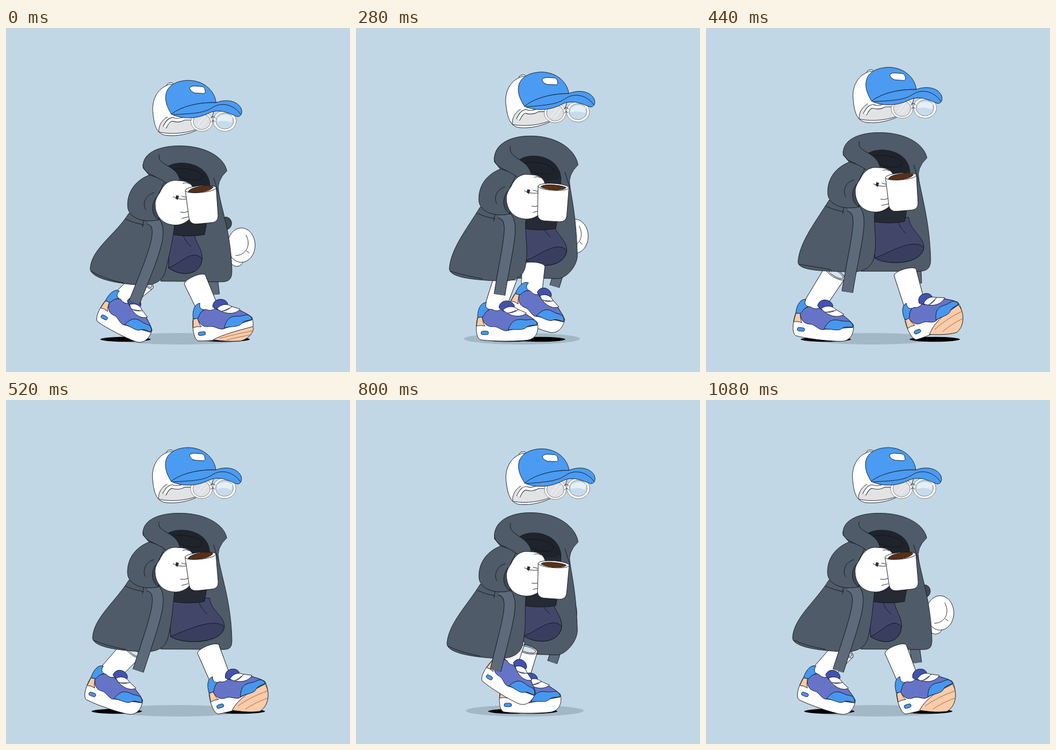
Animation of 600x600 px, one loop 1.12 s. Source, as an HTML page with a canvas:

```html
<!DOCTYPE html>
<html lang="en">
<head>
<meta charset="utf-8">
<title>Coffee walk</title>
<style>
html, body { margin: 0; height: 100%; overflow: hidden; background: #c1d7e5; }
canvas { display: block; width: 600px; height: 600px; }
</style>
</head>
<body>
<canvas id="stage" width="600" height="600"></canvas>
<script>
const ctx = document.getElementById('stage').getContext('2d');
const LOOP = 1120, STEP = LOOP / 2, TICK = 40;
const INK = '#111318', COAT = '#4f5b68', CUFF = '#3f4955', BELT = '#5d6a79';
const BLUE = '#4698ee', CAP = '#4a9bf1', PEACH = '#fccba9';
const LINE = 0.85;

// Swings between -1 and 1, highest at the given time.
const wave = (t, peak, period = STEP) => Math.cos(2 * Math.PI * (t - peak) / period);

// Soft pulse around one moment of the loop.
function bump(t, peak, width) {
  const d = (t - peak + 2.5 * LOOP) % LOOP - LOOP / 2;
  return Math.exp(-((d / width) ** 2));
}

const clamp = v => Math.min(1, Math.max(0, v));

const warp = (d, map) =>
  d.replace(/(-?[\d.]+) (-?[\d.]+)/g, (_, x, y) => map(+x, +y).join(' '));

function paint(path, fill, line) {
  if (fill) { ctx.fillStyle = fill; ctx.fill(path); }
  if (line) { ctx.strokeStyle = line; ctx.lineWidth = LINE; ctx.stroke(path); }
}

const draw = (d, fill, line = INK) => paint(new Path2D(d), fill, line);

function oval(x, y, rx, ry, fill, line = INK) {
  const p = new Path2D();
  p.ellipse(x, y, rx, ry, 0, 0, 7);
  paint(p, fill, line);
}

// Thick outlined strip along a path.
function band(d, width, fill) {
  const p = new Path2D(d);
  ctx.strokeStyle = INK; ctx.lineWidth = width; ctx.stroke(p);
  ctx.strokeStyle = fill; ctx.lineWidth = width - 2 * LINE; ctx.stroke(p);
}

function placed(x, y, degrees, content) {
  ctx.save();
  ctx.translate(x, y);
  ctx.rotate(degrees * Math.PI / 180);
  content();
  ctx.restore();
}

// Pose of one foot; t counts from its heel strike.
function gait(t, shift) {
  const push = bump(t, 690, 180), heel = bump(t, 1025, 78);
  const x = 281 + shift + 96 * wave(t, 1090, LOOP) + 8 * wave(t, 440);
  return {
    x,
    y: 516 - 20 * bump(t, 800, 170) - 11 * push - 11 * heel,
    turn: 46 * push - 29 * heel,
    sockX: 275 + shift + 56 * wave(t, 1080, LOOP),
    sockY: 435 + 10 * wave(t, 98) - 16 * bump(t, 820, 90),
    shadowX: x + 4 - 30 * bump(t, 650, 70)
  };
}

function shoe(turn) {
  draw('M-51 -12C-55 5 -54 25 -46 28C-26 31 20 31 38 28C54 24 56 8 53 -3L29 -20L-41 -20Z', '#fff');
  const k = clamp(-turn / 14);
  if (k > 0.1) {
    draw(`M-20 29C-2 ${30 - 18 * k} 25 ${28 - 22 * k} 52 ${24 - 22 * k}C57 14 50 ${28 + 12 * k} 28 ${29 + 16 * k}C8 ${30 + 12 * k} -8 ${30 + 4 * k} -20 29Z`, PEACH);
    draw(`M-8 ${30 - 5 * k}Q20 ${30 - 14 * k} 53 ${26 - 11 * k}M4 ${30 + 4 * k}Q24 ${30 - 2 * k} 49 ${28 - k}`, null, '#8a6a55');
  }
  draw('M-51 -10L-43 -13C-42 -3 -40 2 -38 4Q-46 2 -53 4Z', PEACH);
  draw('M-44 -15C-36 -22 -30 -26 -26 -25C-18 -20 -10 -24 -8 -28C10 -22 28 -22 38 -14C48 -8 53 -4 53 2L4 11C-6 16 -14 4 -24 5C-34 6 -42 0 -44 -15Z', '#6674c8');
  draw('M-51 -12C-51 -27 -45 -37 -36 -37C-39 -28 -34 -26 -30 -25C-38 -22 -40 -14 -42 -12Q-47 -10 -51 -12Z', BLUE);
  draw('M2 11C8 -6 16 -9 30 -7C40 -6 48 -12 53 0C52 4 40 0 34 6C28 13 12 8 2 11Z', BLUE);
  draw('M-14 -28C-13 -40 0 -43 9 -37C15 -32 14 -27 8 -27L-6 -22Z', '#4252b0');
  draw('M-7 -24C2 -33 14 -30 18 -26L34 -19C26 -11 8 -11 -7 -24ZM1 -19Q10 -18 20 -25', '#fff');
  const tag = new Path2D();
  tag.roundRect(-45, 13, 13, 6, 3);
  paint(tag, BLUE, INK);
}

function leg({ x, y, turn, sockX, sockY }) {
  const a = turn * Math.PI / 180, cos = Math.cos(a), sin = Math.sin(a);
  const dx = x - 22 * cos + 24 * sin - sockX, dy = y - 22 * sin - 24 * cos - sockY;
  const len = Math.hypot(dx, dy);
  placed(sockX, sockY, -Math.atan2(dx, dy) * 180 / Math.PI, () => {
    draw(`M-20 0C-20 -9 20 -9 20 0L18 ${len + 4}L-18 ${len + 4}Z`, '#fff');
    if (dx < -4) {
      oval(0, 0, 20, 7, '#fff');
      oval(1, 0, 16, 5, '#d5e3ee');
    }
  });
  placed(x, y, turn, () => {
    ctx.scale(1 - 0.003 * Math.abs(turn), 1);
    shoe(turn);
  });
}

function backArm(t, bob) {
  const x = 375 + 36 * wave(t, 30, LOOP), y = 371 + 17 * bob;
  oval(x - 8, y + 27, 11, 10, '#fff');
  oval(x, y, 24, 30, '#fff');
  draw(`M${x + 8} ${y - 18}C${x + 18} ${y} ${x + 8} ${y + 18} ${x - 10} ${y + 18}M${x + 9} ${y + 10}L${x + 14} ${y + 14}`);
  oval(x - 27, y - 38, 10, 11, CUFF);
}

function backBelt(t, bob) {
  const y = 458 + 16 * bob;
  band(`M${359 + 7 * wave(t, 420)} ${y - 42}L${355 + 14 * wave(t, 480)} ${y}`, 18, BELT);
}

function shorts(t, collar, bob, sway) {
  const ax = 341 + 14 * wave(t, 530, LOOP), ay = collar + 148;
  const bx = 361 + 20 * wave(t, 500, LOOP), by = 395 + 16 * bob;
  const cx = 290 + 9 * sway, cy = 412 + 14 * bob;
  const opening = `C${bx - 3} ${by + 30} ${cx + 22} ${by + 32} ${cx} ${cy}Z`;
  draw(`M285 ${ay}L${ax} ${ay}C${ax + 2} ${ay + 22} ${bx + 1} ${by - 18} ${bx} ${by}${opening}`, '#42476a');
  draw(`M${cx} ${cy}C${cx + 22} ${cy - 8} ${bx - 18} ${by - 18} ${bx} ${by}${opening}`, '#393e5f');
  draw(`M${ax - 18} ${ay + 8}Q${ax - 14} ${ay + 20} ${ax - 4} ${ay + 28}`);
}

function cup(x, y, lean) {
  const slosh = 4 * (1 - lean);
  placed(x, y, -6 + 10 * lean, () => {
    draw('M-27 -27L-25 22Q-24 33 -12 33L14 33Q25 33 26 22L27 -27Q0 -37 -27 -27Z', '#fff');
    oval(0, -27, 27, 6, '#fff');
    draw(`M-22 ${-26 + slosh / 2}C-20 -32 14 ${-31 - slosh} 22 ${-27 - slosh / 2}C18 -21 -10 -20 -22 ${-26 + slosh / 2}Z`, '#5a3014');
  });
}

function cap() {
  draw('M280 105Q280 96 288 96Q294 96 294 103Z', '#fff');
  draw('M286 99C262 106 254 130 257 150C259 172 264 186 280 188C300 190 320 186 340 176L350 150L310 100Z', '#fff');
  draw('M267 182C266 165 280 152 300 150L362 138Q366 158 346 172C320 185 290 187 267 182Z', '#e2e3e5');
  draw('M279 154Q296 165 313 154L345 145L300 144Z', '#fff', null);
  band('M277 174Q284 160 291 160Q302 164 312 158L330 158', 7, '#fff');
  const rim = '#77797c';
  oval(342, 164, 19, 17, '#fff', rim);
  oval(342, 164, 15, 14, '#dfe1e4', rim);
  draw('M334 171L348 153M339 174L353 158', null, '#fff');
  oval(382, 163, 20, 18, '#fff', rim);
  oval(382, 163, 15.5, 14, '#c6dcec', rim);
  draw('M369 157Q382 148 396 156L394 166Q382 160 369 164Z', '#e7eff6', null);
  draw('M357 158Q362 153 366 158M358 165Q362 160 365 165');
  draw('M279 122C279 100 300 92 320 92C348 93 365 112 367 131C340 130 310 136 289 151C283 141 279 132 279 122Z', CAP);
  draw('M289 151C305 138 335 130 367 131C385 124 405 128 411 142C414 152 408 157 402 155C385 147 370 142 355 149C335 159 310 161 289 151Z', CAP);
  draw('M292 152C316 150 344 151 360 140C376 129 398 134 410 152');
  draw('M321 106Q322 102 330 102L343 103Q347 104 348 110Q349 115 345 115L330 114Q323 112 321 106Z', '#fff');
}

function scene(t) {
  ctx.fillStyle = '#c1d7e5';
  ctx.fillRect(0, 0, 600, 600);

  const bob = wave(t, 98), sway = wave(t, 348), drop = wave(t, 125);
  const lean = 0.5 + 0.5 * wave(t, 230);
  const collar = 197 + 19 * bob;
  const near = gait(t, 0), far = gait(t + STEP, 22);

  // Moves the torso; everything below the collar sinks a little with the lean.
  const up = (x, y) => {
    const d = y - 207;
    return [x + 2.5 * lean, collar + d + 8 * lean * clamp(d / 40)];
  };
  const body = (d, fill, line) => draw(warp(d, up), fill, line);

  oval(297 + 12 * wave(t, 80), 542, 109 + 8 * wave(t, 20), 10, '#a3b8c6', null);
  for (const foot of [far, near]) oval(foot.shadowX, 543, 44, 4.2, '#000', null);

  backArm(t, bob);
  backBelt(t, bob);

  // Coat, back and right side
  const qx = 390 + 4 * wave(t, 540), qy = 407 + 16 * wave(t, 60);
  const px = 362 + 12 * wave(t, 520), py = 440 + 17 * drop, hem = 439 + 16 * drop;
  draw(warp('M239 245C236 215 275 207 300 207C345 206 380 225 385 250Q366 268 371 288', up) +
    `C378 ${collar + 118} ${qx - 2} ${qy - 60} ${qx} ${qy}C${qx + 1} ${qy + 20} ${px + 16} ${py} ${px} ${py}Q320 ${hem} 270 ${hem}` +
    warp('L262 340L260 300L250 258Z', up), COAT);
  body('M362 262Q366 276 371 290');

  shorts(t, collar, bob, sway);
  body('M281 243C300 230 350 235 355 272Q355 320 346 361Q320 366 290 361L280 300Z', '#262a34');
  body('M283 243C300 230 350 235 355 270Q350 280 320 276Z', '#1f232c', null);
  body('M288 248C305 242 340 248 343 260C340 270 312 267 297 258');

  leg(far);
  leg(near);

  // Left front panel
  const lx = 155 + 11 * sway, ly = 418 + 12 * wave(t, 140);
  const rx = 286 + 12 * sway, low = 445 + 21 * drop, ry = low - 22;
  const [ax, ay] = up(214, 324), [tx, ty] = up(294, 343);
  const mid = (lx + rx) / 2 + 25;
  draw(`M${ax} ${ay}C${ax - 22} ${ay + 36} ${lx + 3} ${ly - 34} ${lx} ${ly}C${lx - 3} ${ly + 18} ${lx + 45} ${low - 2} ${mid} ${low}C${rx - 16} ${low} ${rx - 5} ${ry + 14} ${rx} ${ry}C${rx + 8} ${ry - 30} ${tx - 3} ${ty + 25} ${tx} ${ty}L${tx} ${ty - 30}Z`, COAT);
  draw(`M${lx + 1} ${ly + 6}Q${lx + 25} ${low - 10} ${lx + 58} ${low - 4}`);
  body('M208 334Q222 341 240 344M240 336L238 348');

  const [bx, by] = up(248, 333), [cx, cy] = up(280, 342), [dx, dy] = up(262, 385);
  band(`M${bx} ${by}C${cx} ${cy} ${dx} ${dy} ${237 + 18.5 * sway} ${472 + 15 * bob}`, 20, BELT);

  // Sleeve and left lapel
  body('M250 257C222 268 211 290 212 312C213 332 240 342 268 335L266 290L278 266Z', COAT);
  body('M272 288C252 298 250 326 266 335Z', CUFF);
  body('M258 288C240 293 238 312 244 318');
  const lapel = 'M239 238C237 256 262 257 280 272L304 270C302 254 292 247 283 242C270 235 265 231 267 222';
  body(lapel + 'L255 216Z', COAT, null);
  body(lapel);

  // Hand and cup
  body('M268 288C276 270 288 265 300 267C312 267 324 270 327 282L323 330C315 342 300 346 290 344C272 342 260 328 260 308C260 300 264 294 268 288Z', '#fff');
  body('M291 295Q302 301 316 299M306 294L318 297M304 322Q312 324 319 320M306 333L318 330M308 272Q314 269 320 273');
  body('M297 293L301 294L299 300L296 298Z', '#23304d');
  cup(342 + lean, collar + 101 + 16 * lean, lean);

  placed(319 + 6 * lean, 132 + 19 * wave(t, 105), -1.8 * lean, () => {
    ctx.translate(-320, -140);
    cap();
  });
}

function frame() {
  scene(Math.floor(performance.now() / TICK) * TICK % LOOP);
  requestAnimationFrame(frame);
}
frame();
</script>
</body>
</html>
```
